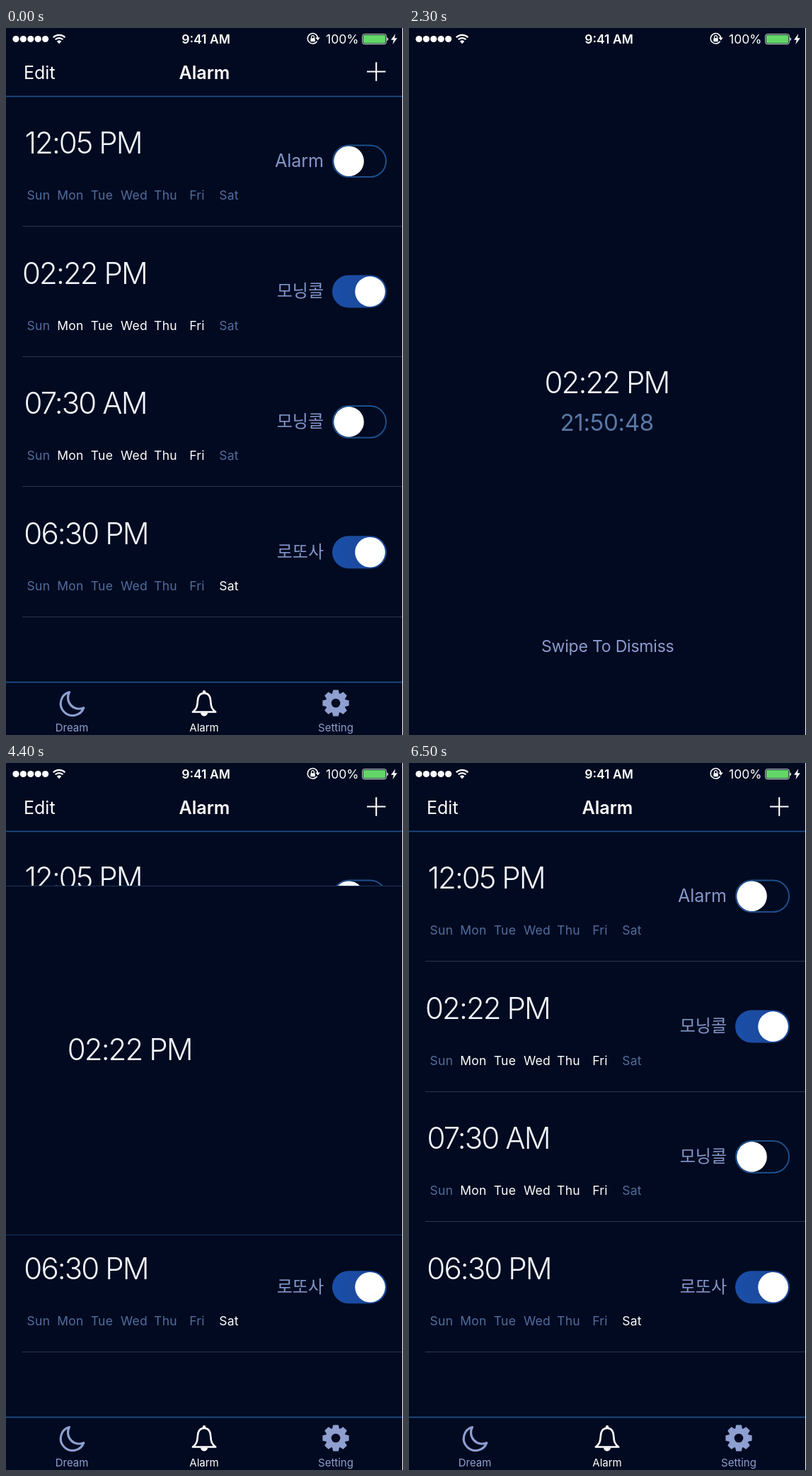
These frames come from a looping animation (561 by 997 pixels, 6.8 s). An HTML page:

```html
<!DOCTYPE html>
<html lang="en">
<head>
<meta charset="utf-8">
<title>Alarm list</title>
<style>
  html, body { margin: 0; width: 100%; height: 100%; overflow: hidden; background: #fff; }
  svg { display: block; width: 561px; height: 997px; }
  text { font-family: Inter, "Noto Sans CJK KR", "Noto Sans CJK", sans-serif; }
  .time { font-size: 42px; font-weight: 300; letter-spacing: -1.9px; fill: #f3f6fc; }
  .day { font-size: 17.5px; letter-spacing: .3px; }
  .label { font-size: 25px; fill: #8496c8; }
  .ko { font-size: 24px; font-family: "Noto Sans CJK KR", "Noto Sans CJK", sans-serif; }
  .nav { font-size: 25px; fill: #fff; }
  .status { font-size: 17.5px; fill: #fff; }
  .tab { font-size: 15px; }
  .bold { font-weight: 600; }
  .count { font-size: 33px; letter-spacing: -.3px; fill: #5977a6; }
  .hint { font-size: 23px; letter-spacing: -.2px; fill: #8c9bce; }
</style>
</head>
<body>
<svg id="stage" viewBox="0 0 561 997"></svg>
<script>
const LOOP = 6800, STEP = 100;
const BG = '#010a20', LINE = '#1d4f8b', DIM = '#526d9d', SOFT = '#8e9fd0';
const DAYS = ['Sun', 'Mon', 'Tue', 'Wed', 'Thu', 'Fri', 'Sat'];
const DAY_X = [46, 91, 135.5, 181, 225.5, 270, 315];
const WEEKDAYS = [1, 2, 3, 4, 5];
const ALARMS = [
  { time: '12:05 PM', x: 109, label: 'Alarm', on: false, days: [] },
  { time: '02:22 PM', x: 111, label: '모닝콜', on: true, days: WEEKDAYS },
  { time: '07:30 AM', x: 112, label: '모닝콜', on: false, days: WEEKDAYS },
  { time: '06:30 PM', x: 113, label: '로또사', on: true, days: [6] }
];
const ROW = 183.8, TOP = 95.5;
const CELL = { top: 279.5, bottom: 463.5, x: 111, y: 360.5 };
const FULL = { top: 0, bottom: 997, x: 279.5, y: 514.5 };

const text = (x, y, cls, str, fill, anchor = 'middle') =>
  `<text x="${x}" y="${y}" class="${cls}" text-anchor="${anchor}"${fill ? ` fill="${fill}"` : ''}>${str}</text>`;
const rect = (x, y, w, h, fill, extra = '') =>
  `<rect x="${x}" y="${y}" width="${w}" height="${h}" fill="${fill}" ${extra}/>`;
const circle = (x, y, r, fill) => `<circle cx="${x}" cy="${y}" r="${r}" fill="${fill}"/>`;
const stroke = (d, color, width, fill = 'none') =>
  `<path d="${d}" stroke="${color}" stroke-width="${width}" fill="${fill}" stroke-linejoin="round"/>`;

function toggle(y, on) {
  const track = on
    ? rect(461, y - 23, 77, 46, 'url(#track)', 'rx="23"')
    : rect(462, y - 22.3, 75, 44.6, 'none', `rx="22.3" stroke="${LINE}" stroke-width="2"`);
  return track + circle(on ? 514.5 : 484.5, y, 21.3, '#fff');
}

function row(alarm, i) {
  const y = TOP + i * ROW;
  const latin = alarm.label === 'Alarm';
  const days = DAYS.map((d, k) =>
    text(DAY_X[k], y + 146.3, 'day', d, alarm.days.includes(k) ? '#fff' : DIM)).join('');
  return rect(23, Math.round(y + ROW - .5), 537, 1, '#2b364d')
    + (i === 1 ? rect(0, CELL.top - .5, 560, 185, '#dcdcdc', 'id="press"') : '')
    + text(alarm.x, y + 81.2, 'time', alarm.time) + days
    + text(449, y + (latin ? 100.7 : 100), latin ? 'label' : 'label ko', alarm.label, '', 'end')
    + toggle(y + 92.3, alarm.on);
}

function gear(x, y) {
  let s = circle(x, y, 14.3, SOFT);
  for (let a = 0; a < 360; a += 45)
    s += `<path d="M-5.2 -12L-3.8 -18.6H3.8L5.2 -12Z" fill="${SOFT}" transform="translate(${x} ${y}) rotate(${a})"/>`;
  return s + circle(x, y, 6.3, BG);
}

function statusBar() {
  let dots = '';
  for (let i = 0; i < 5; i++) dots += circle(14 + i * 10.4, 15.5, 4.6, '#fff');
  const wifi = stroke('M66.8 13.2A11.8 11.8 0 0 1 83.4 13.2M69.7 16.3A7.7 7.7 0 0 1 80.5 16.3', '#fff', 2.3)
    + '<path d="M75.1 22.3L71.8 18.8A4.8 4.8 0 0 1 78.4 18.8Z" fill="#fff"/>';
  const lock = stroke('M439.6 18.6A7.2 7.2 0 1 1 440.6 14', '#fff', 1.5)
    + '<path d="M437.3 13.6H443.8L440.6 17.6Z" fill="#fff"/>'
    + rect(430.3, 14.2, 6.4, 5, '#fff', 'rx=".6"')
    + stroke('M431.6 14.5V12.6A1.9 1.9 0 0 1 435.4 12.6V14.5', '#fff', 1.2);
  const battery = rect(503.7, 8.7, 33.6, 14, 'none', 'rx="2.5" stroke="#dfe6e6" stroke-width="1"')
    + rect(505, 10, 31, 11.4, '#62d667', 'rx="1.3"')
    + '<path d="M538.3 13.2A2.6 2.6 0 0 1 538.3 18.2Z" fill="#dfe6e6"/>'
    + '<path d="M550.2 8.2L544 16.8H547.7L546.4 23L552.8 14.2H549Z" fill="#fff"/>';
  return dots + wifi + text(282.5, 22, 'status bold', '9:41 AM') + lock
    + text(498.5, 22, 'status', '100%', '', 'end') + battery;
}

function tabBar() {
  const moon = stroke('M89.5 936.5A16.8 16.8 0 1 0 109.8 958.6A15.8 15.8 0 0 1 89.5 936.5Z', SOFT, 3.1);
  const bell = stroke('M263.8 964.5C269.5 960.5 270.4 956 270.8 949.5C271.2 942 274.5 938 280 938'
    + 'C285.5 938 288.8 942 289.2 949.5C289.6 956 290.5 960.5 296.2 964.5Z', '#fff', 2.6)
    + circle(280, 936.3, 2.2, '#fff')
    + '<path d="M275 965.5H285A5 5 0 0 1 275 965.5Z" fill="#fff"/>';
  return rect(0, 921.7, 560, 1.7, LINE) + moon + bell + gear(466, 952)
    + text(93, 992, 'tab', 'Dream', SOFT)
    + text(280, 992, 'tab', 'Alarm', '#fff')
    + text(466, 992, 'tab', 'Setting', SOFT);
}

const navBar = text(25, 72, 'nav', 'Edit', '', 'start')
  + text(280.5, 72, 'nav bold', 'Alarm')
  + stroke('M510 61.5H536.4M523.2 48.3V74.7', '#fff', 2.1)
  + rect(0, 95.6, 560, 1.7, LINE);

const detail = '<g id="detail">'
  + rect(0, 0, 560, 997, BG, 'id="panel" stroke="#16365f" stroke-width="1"')
  + '<text id="big" class="time" text-anchor="middle">02:22 PM</text>'
  + '<g id="info"><text id="count" class="count" x="279.7" y="568" text-anchor="middle"></text>'
  + text(280.8, 880, 'hint', 'Swipe To Dismiss') + '</g></g>';

document.getElementById('stage').innerHTML =
  '<defs><linearGradient id="track"><stop stop-color="#1a4ea8"/><stop offset="1" stop-color="#1d4796"/></linearGradient></defs>'
  + rect(0, 0, 560, 997, BG)
  + ALARMS.map(row).join('') + navBar + tabBar() + detail + statusBar()
  + rect(560, 0, 1, 997, '#fff');

const el = id => document.getElementById(id);
const [press, group, panel, big, info, count] =
  ['press', 'detail', 'panel', 'big', 'info', 'count'].map(el);
const clamp = v => Math.max(0, Math.min(1, v));
const mix = (a, b, k) => a + (b - a) * k;

// How far the detail panel is open: 0 is the list cell, 1 the full stage.
const drag = t => clamp(((6923 - t) / 4103) ** 2);
function openness(t) {
  if (t < 2300) return 1 - (1 - clamp((t - 1500) / 800)) ** 2;
  if (t <= 5200) return drag(t);
  return drag(5200) * (1 - clamp((t - 5200) / 400));
}

function setBox(k) {
  const top = Math.floor(mix(CELL.top, FULL.top, k)) + .5;
  const bottom = Math.floor(mix(CELL.bottom, FULL.bottom, k)) + .5;
  const side = 1 - 4 * k; // the side borders slide off the stage
  panel.setAttribute('x', side);
  panel.setAttribute('width', 560 - 2 * side);
  panel.setAttribute('y', top);
  panel.setAttribute('height', bottom - top);
  panel.style.strokeOpacity = k < 1 ? 1 : 0;
}

function draw(ms) {
  const t = Math.floor((ms % LOOP) / STEP) * STEP;
  const k = openness(t);
  press.style.display = t >= 1300 && t < 2300 ? '' : 'none';
  group.style.display = k > 0 ? '' : 'none';
  setBox(k);
  big.setAttribute('x', mix(CELL.x, FULL.x, k));
  big.setAttribute('y', mix(CELL.y, FULL.y, k));
  info.style.opacity = t < 2500 ? clamp((t - 1900) / 400) : clamp((3300 - t) / 500);
  count.textContent = t < 2600 ? '21:50:48' : '21:50:47';
}

const start = performance.now();
function tick() {
  draw(performance.now() - start);
  requestAnimationFrame(tick);
}
tick();
</script>
</body>
</html>
```
